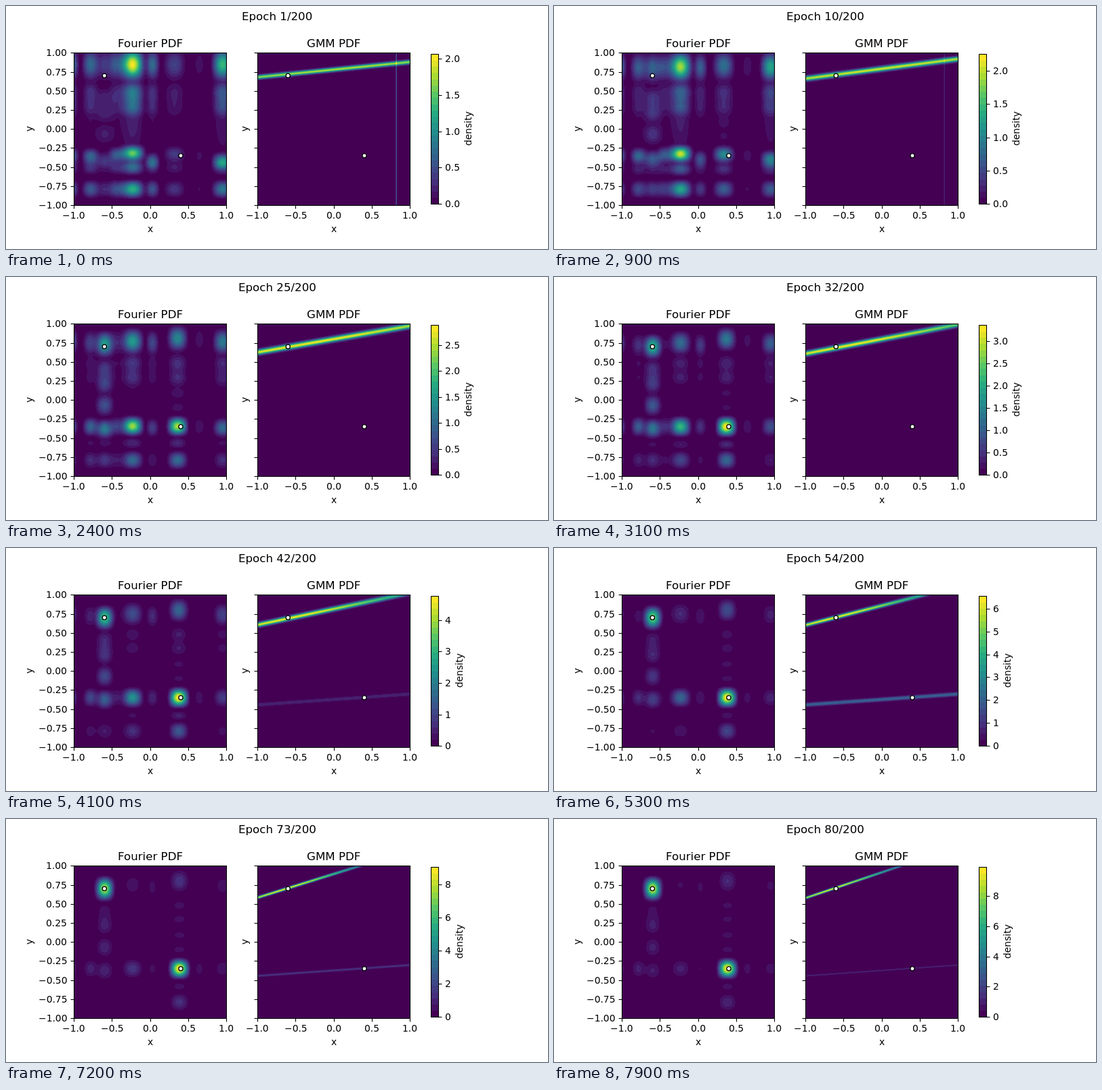
Write an HTML page with a canvas that moves like this. It is 800x360 px and loops after 8 s.

```html
<!DOCTYPE html>
<html lang="en">
<head>
<meta charset="utf-8">
<title>Density training</title>
<style>
  html, body { margin: 0; width: 100%; height: 100%; overflow: hidden; background: #fff; }
  canvas { display: block; width: 800px; height: 360px; }
</style>
</head>
<body>
<canvas id="stage" width="800" height="360"></canvas>
<script>
const ctx = document.getElementById('stage').getContext('2d');
const LOOP = 8000, STEP = 100;
const SIZE = 225, TOP = 70, LEFT = [100, 371];
const UNIT = 112.7, UNIT_Y = 112.8, Y0 = 69.4;
const BANDS = 24;
const BAR = { x: 627.5, y: 71.5, w: 11, h: 222 };
const FONT = '"DejaVu Sans", sans-serif';
const SMALL = '13.89px ' + FONT, LARGE = '16.67px ' + FONT;

// Key times: a full set and a shorter one for the lobes
const TIMES = [0, 1700, 3100, 4100, 5300, 6500, 7900];
const FEW = [0, 1700, 3100, 5300, 7900];

function key(t, values, times = FEW) {
  let i = 1;
  while (i < times.length - 1 && t > times[i]) i++;
  const p = Math.min(1, (t - times[i - 1]) / (times[i] - times[i - 1]));
  return values[i - 1] + (values[i] - values[i - 1]) * p;
}
const full = (t, values) => key(t, values, TIMES);
const mix = (a, b, p) => a + (b - a) * p;

// Viridis ramp, one colour per contour band
const anchors = ['440154', '472d7b', '3b528b', '2c728e', '21918c', '28ae80', '5ec962', 'addc30', 'fde725']
  .map(h => [0, 2, 4].map(i => parseInt(h.slice(i, i + 2), 16)));
const palette = Array.from({ length: BANDS }, (_, k) => {
  const p = k / (BANDS - 1) * (anchors.length - 1);
  const i = Math.min(anchors.length - 2, Math.floor(p));
  return anchors[i].map((c, j) => Math.round(mix(c, anchors[i + 1][j], p - i)));
});

const toX = x => (x + 1) * UNIT;
const toY = y => Y0 + (1 - y) * UNIT_Y;
const xs = Array.from({ length: SIZE }, (_, i) => (i + 0.5) / UNIT - 1);
const ys = Array.from({ length: SIZE }, (_, j) => 1 - (TOP + j + 0.5 - Y0) / UNIT_Y);

// Columns of lobes: centre, width, final upper y, initial lower y, strengths
const columns = [
  { x: -1.02, w: 0.10, up: 0.75, low: -0.35, top: [0.35, 0.28, 0.2, 0.07, 0], bot: [0.3, 0.25, 0.22, 0.12, 0.07] },
  { x: -0.78, w: 0.13, up: 0.72, low: -0.36, top: [0.33, 0.25, 0.15, 0.06, 0.03], bot: [0.33, 0.35, 0.3, 0.14, 0.1] },
  { x: -0.595, w: 0.155, up: 0.7, low: -0.4, top: [0.18, 0.42, 0.62, 0.77, 0.93], bot: [0.15, 0.42, 0.4, 0.2, 0.09] },
  { x: -0.43, w: 0.13, up: 0.73, low: -0.34, top: [0.28, 0.2, 0.05, 0.03, 0.03], bot: [0.3, 0.28, 0.15, 0.03, 0] },
  { x: -0.23, w: 0.18, up: 0.75, low: -0.32, top: [0.92, 0.68, 0.35, 0.13, 0.045], bot: [0.72, 1, 0.65, 0.33, 0.1] },
  { x: 0.03, w: 0.11, up: 0.72, low: -0.42, top: [0.33, 0.25, 0.18, 0.08, 0.05], bot: [0.3, 0.22, 0.15, 0.08, 0.042] },
  { x: 0.385, w: 0.17, up: 0.8, low: -0.33, top: [0.2, 0.48, 0.4, 0.25, 0.13], bot: [0.18, 0.7, 1, 1, 1] },
  { x: 0.645, w: 0.1, up: 0.78, low: -0.35, top: [0.06, 0.08, 0.06, 0, 0], bot: [0.05, 0.08, 0.08, 0.06, 0.06] },
  { x: 0.95, w: 0.16, up: 0.74, low: -0.42, top: [0.62, 0.48, 0.3, 0.1, 0.05], bot: [0.46, 0.42, 0.25, 0.11, 0.06] }
];
const TALL = columns[2], DEEP = columns[6];

function lobe(d, w) {
  const u = Math.abs(d) / w;
  return u < 1 ? Math.cos(u * Math.PI / 2) ** 2 : 0;
}

// Vertical lobes of one column as [y, width, strength]
function lobes(c, t, settle) {
  const top = key(t, c.top), bot = key(t, c.bot);
  const list = [
    [mix(0.85, c.up, settle), mix(0.27, 0.2, settle), top],
    [mix(c.low, c === TALL ? -0.375 : -0.35, settle), mix(0.14, 0.17, settle), bot],
    [-0.79, 0.16, bot * key(t, [0.87, 0.5, 0.34, 0.22, 0.12])],
    [mix(-0.5, -0.585, settle), mix(0.14, 0.09, settle), bot * key(t, [0.5, 0.17, 0.13, 0.065, 0.06])],
    [0.3, 1, top * key(t, [0.14, 0.14, 0.03, 0, 0])]
  ];
  if (c === TALL) {
    list.push([0.4, 0.17, key(t, [0.1, 0.16, 0.14, 0.1, 0.06])],
      [0.22, 0.18, key(t, [0.1, 0.18, 0.18, 0.13, 0.1])],
      [-0.07, 0.18, key(t, [0.08, 0.18, 0.27, 0.17, 0.1])]);
  } else {
    const w = mix(0.18, 0.1, t / LOOP);
    list.push([0.48, w, top * key(t, [0.34, 0.25, 0.28, 0.25, 0.42])],
      [0.3, w, top * key(t, [0.28, 0.2, 0.26, 0.25, 0.42])]);
  }
  if (c === DEEP) {
    const dot = key(t, [0, 0.03, 0.045, 0.06, 0.06]);
    list.push([0.09, 0.09, dot], [-0.1, 0.09, dot]);
  }
  return list;
}

function fourier(t) {
  const settle = Math.min(1, t / 3100);
  const spread = mix(1.15, 1, settle);
  const parts = columns.map(c => {
    const x = c === DEEP ? key(t, [0.32, 0.35, 0.37, 0.38, 0.385]) : c.x;
    const list = lobes(c, t, settle);
    return {
      gx: xs.map(v => lobe(v - x, c.w * spread)),
      gy: ys.map(v => list.reduce((s, [y, w, a]) => s + a * lobe(v - y, w), 0))
    };
  });
  return (i, j) => {
    let sum = 0;
    for (const { gx, gy } of parts) sum += gx[i] * gy[j];
    return sum;
  };
}

const bell = u => Math.exp(-u * u / 2);

function mixture(t) {
  const start = full(t, [0.68, 0.645, 0.607, 0.605, 0.602, 0.587, 0.577]);
  const slope = full(t, [0.1, 0.155, 0.192, 0.21, 0.256, 0.285, 0.337]);
  const thick = full(t, [0.019, 0.026, 0.023, 0.021, 0.017, 0.0135, 0.011]);
  const peak = full(t, [0.86, 0.96, 0.96, 0.96, 0.96, 0.96, 0.96]);
  const mid = full(t, [0.1, -0.1, -0.4, -0.55, -0.6, -0.62, -0.65]);
  const span = full(t, [3, 3, 1.8, 1.4, 1.05, 0.85, 0.65]);
  const faint = full(t, [0, 0, 0, 0.12, 0.33, 0.2, 0.1]);
  const faintThick = full(t, [0.018, 0.018, 0.018, 0.018, 0.0175, 0.015, 0.009]);
  const spike = 0.28 * Math.max(0, 1 - t / 1500);
  return (i, j) => {
    const x = xs[i], y = ys[j];
    return peak * bell((x - mid) / span) * bell((y - start - slope * (x + 1)) / thick)
      + faint * bell((y + 0.445 - 0.071 * (x + 1)) / faintThick)
      + spike * bell((x - 0.82) / 0.005);
  };
}

function paint(field, left) {
  const img = ctx.createImageData(SIZE, SIZE);
  for (let j = 0, n = 0; j < SIZE; j++) {
    for (let i = 0; i < SIZE; i++, n += 4) {
      const band = Math.min(BANDS - 1, Math.floor(field(i, j) * BANDS));
      const c = palette[band];
      img.data[n] = c[0];
      img.data[n + 1] = c[1];
      img.data[n + 2] = c[2];
      img.data[n + 3] = 255;
    }
  }
  ctx.putImageData(img, left, TOP);
}

// Text starts on whole pixels; align is the share of its width left of x
function text(str, x, y, align = 0.5, font = SMALL) {
  ctx.font = font;
  const start = x - ctx.measureText(str).width * align;
  ctx.fillText(str, Math.round(start), Math.round(y));
}

function upright(str, x, y) {
  ctx.save();
  ctx.translate(x, y);
  ctx.rotate(-Math.PI / 2);
  text(str, 0, 0);
  ctx.restore();
}

function line(x1, y1, x2, y2) {
  ctx.beginPath();
  ctx.moveTo(x1, y1);
  ctx.lineTo(x2, y2);
  ctx.stroke();
}

const signed = (v, digits) => v.toFixed(digits).replace('-', '\u2212');
const snap = v => Math.round(v) + 0.5;

function panel(left, title, withLabels) {
  ctx.strokeRect(left + 0.5, snap(toY(1)), SIZE, 226);
  for (let v = -1; v <= 1; v += 0.5) {
    const x = left + toX(v);
    line(snap(x), 296, snap(x), 300.5);
    text(signed(v, 1), x, 315);
  }
  for (let v = -1; v <= 1; v += 0.25) {
    const y = toY(v);
    line(left - 4.5, snap(y), left + 0.5, snap(y));
    if (withLabels) text(signed(v, 2), left - 9.7, y + 5, 1);
  }
  text(title, left + UNIT, 61, 0.5, LARGE);
  text('x', left + UNIT, 335);
  upright('y', left === LEFT[0] ? 39 : 357, 182);

  ctx.save();
  for (const [x, y] of [[-0.6, 0.7], [0.4, -0.35]]) {
    ctx.beginPath();
    ctx.arc(left + 0.2 + toX(x), toY(y), 3.1, 0, 7);
    ctx.fillStyle = '#fff';
    ctx.fill();
    ctx.lineWidth = 1.3;
    ctx.stroke();
  }
  ctx.restore();
}

function colorbar(t) {
  const max = full(t, [2.065, 2.425, 3.355, 4.765, 6.55, 8.22, 9.92]);
  const bandY = k => Math.round(BAR.y + BAR.h * (1 - k / BANDS));
  for (let k = 0; k < BANDS; k++) {
    ctx.fillStyle = `rgb(${palette[k]})`;
    ctx.fillRect(BAR.x, bandY(k + 1), BAR.w, bandY(k) - bandY(k + 1));
  }
  ctx.fillStyle = '#000';
  ctx.strokeRect(BAR.x, BAR.y, BAR.w, BAR.h);
  const step = [0.5, 1, 2].find(s => max / s <= 7);
  for (let v = 0; v <= max; v += step) {
    const y = BAR.y - 0.4 + BAR.h * (1 - v / max);
    line(638.5, snap(y), 643.5, snap(y));
    text(v.toFixed(step < 1 ? 1 : 0), 648, y + 5, 0);
  }
  upright('density', step < 1 ? 687 : 674, 182);
}

function draw(t) {
  ctx.fillStyle = '#fff';
  ctx.fillRect(0, 0, 800, 360);
  paint(fourier(t), LEFT[0]);
  paint(mixture(t), LEFT[1]);
  ctx.fillStyle = ctx.strokeStyle = '#000';
  ctx.lineWidth = 1.1;
  text(`Epoch ${1 + t / STEP}/200`, 400, 21, 0.5, LARGE);
  panel(LEFT[0], 'Fourier PDF', true);
  panel(LEFT[1], 'GMM PDF', false);
  colorbar(t);
}

const begin = performance.now();
let shown = -1;
function tick() {
  const elapsed = (performance.now() - begin) % LOOP;
  const t = Math.floor(elapsed / STEP) * STEP;
  if (t !== shown) draw(shown = t);
  requestAnimationFrame(tick);
}
tick();
</script>
</body>
</html>
```
